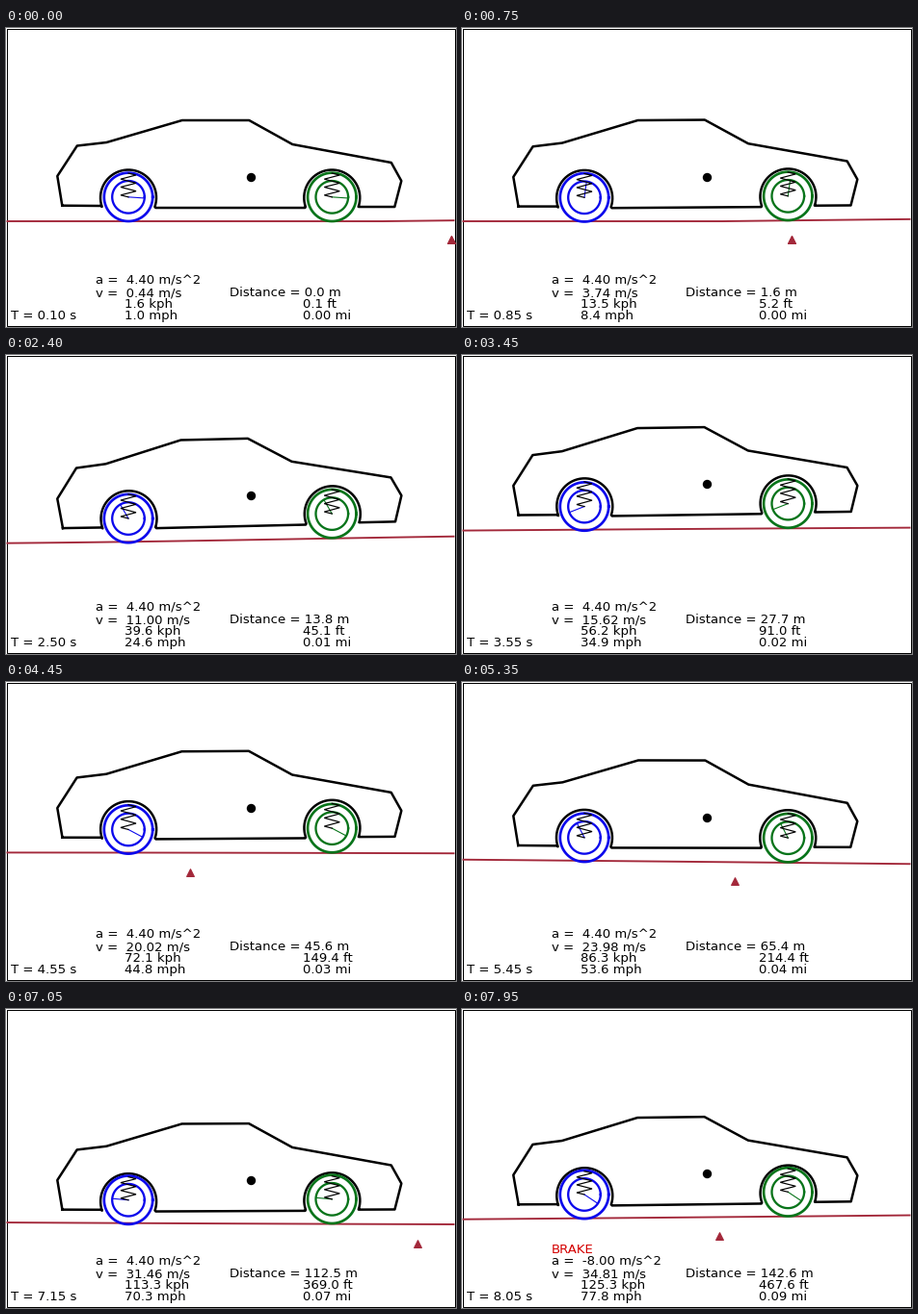
Animation, 467 px wide and 311 px high, one loop 8000 ms. Source, as a matplotlib script:

```python
import numpy as np
import matplotlib.pyplot as plt
from matplotlib.animation import FuncAnimation

W, H, DPI = 467, 311, 64
PX = 72 / DPI              # points per pixel
SCALE = 76.7               # pixels per metre
CG_X, CG_Y = 254.3, 155.0
ROAD_Y = 201.0
WHEEL_R = 0.3284           # metres
AXLES = (-127.3, 84.0)     # pixels from the centre of gravity
MARK_START, MARK_GAP = 2.735, 7.0
BLUE, GREEN, BROWN = "#0c08ec", "#08741a", "#a3283a"

plt.rcParams["font.family"] = "DejaVu Sans"
fig = plt.figure(figsize=(W / DPI, H / DPI), dpi=DPI, facecolor="white")
ax = fig.add_axes([0, 0, 1, 1])
ax.set_xlim(0, W)
ax.set_ylim(H, 0)
ax.axis("off")


def line(color, width, **kw):
    return ax.plot([], [], color=color, lw=width * PX, **kw)[0]


def label(x, y, color="black"):
    return ax.text(x, y, "", fontsize=13.2 * PX, color=color, va="baseline")


def arch(cx):
    """Wheel arch, traced from its front end over the top to the back."""
    a = np.radians(np.linspace(-19, 199, 40))
    return np.column_stack([cx + 29 * np.cos(a), 21.5 - 29 * np.sin(a)])


def body_shape():
    top = [(-196, 29.7), (-201, -1), (-180.5, -32.5), (-150, -36),
           (-71.5, -59), (-2, -59), (43, -34), (145.5, -15), (156, 4),
           (149, 31), (112, 31)]
    sill = [(56, 32), (-99, 32)]
    tail = [(-156, 30), (-196, 29.7)]
    return np.vstack([top, arch(AXLES[1]), sill, arch(AXLES[0]), tail])


def road(x):
    """Road height in pixels at x metres."""
    rise = 23.6 * np.sin(np.maximum(x - 1.8, 0) / 25.3)
    return rise - 2.7 * np.exp(-((x - 11.3) / 4.4) ** 2)


def drive(n):
    """Speed, distance and braking steps after n steps of 1 ms."""
    k = min(n, 8001)
    b = n - k
    top = 0.0044 * k
    dist = 2.2e-6 * k * (k + 1) + 0.001 * b * top - 4e-6 * b * (b + 1)
    return top - 0.008 * b, dist, b


BODY = body_shape()
TURN = np.linspace(0, 2 * np.pi, 80)
COIL_X = np.array([0, 8, -8, 8, -8, 8, -8, 0])
COIL_T = np.concatenate([[0], np.linspace(0.08, 0.92, 6), [1]])
ROAD_PX = np.linspace(0.5, 465.5, 120)

# frame and axis ticks
ax.plot([0.5, 465.5, 465.5, 0.5, 0.5], [0.5, 0.5, 309.5, 309.5, 0.5],
        color="black", lw=PX, solid_joinstyle="miter")
for m in range(-3, 3):
    x = CG_X + m * SCALE
    ax.plot([x, x], [309.5, 311], color="black", lw=0.8 * PX)

road_line = line(BROWN, 1.9, solid_capstyle="butt")
marks = line(BROWN, 0, marker="^", markersize=8 * PX, markeredgewidth=PX)
body = line("black", 2.5, solid_joinstyle="round")
wheels = [(line(color, 2.7), line(color, 2.3), line(color, 1.1),
           line("black", 1.2, solid_joinstyle="miter"))
          for color in (BLUE, GREEN)]
dot = line("black", 0, marker="o", markersize=9.4 * PX, markeredgewidth=0)

brake = label(92.7, 254.4, "#d40000")
accel = label(92.7, 266.6)
speed = label(92.8, 279.2)
kph = label(123.4, 291.2)
mph = label(123.4, 303.4)
clock = label(4.8, 303.4)
metres = label(232.2, 279.2)
feet = label(308.4, 291.2)
miles = label(308.4, 303.4)


def draw_wheel(parts, cx, cy, turn, spring_x, spring_y):
    rim, hub, spoke, spring = parts
    r = WHEEL_R * SCALE
    rim.set_data(cx + r * np.cos(TURN), cy + r * np.sin(TURN))
    hub.set_data(cx + 16.8 * np.cos(TURN), cy + 16.8 * np.sin(TURN))
    spoke.set_data([cx, cx + 16.8 * np.cos(turn)],
                   [cy, cy + 16.8 * np.sin(turn)])
    spring.set_data(spring_x + (cx - spring_x) * COIL_T + COIL_X,
                    spring_y + (cy - spring_y) * COIL_T)


def update(i):
    n = 100 + 50 * i
    t = n / 1000
    v, d, braking = drive(n)

    road_line.set_data(ROAD_PX, ROAD_Y - road(d + (ROAD_PX - CG_X) / SCALE))
    first = np.floor((d - 6) / MARK_GAP)
    mx = MARK_START + MARK_GAP * np.maximum(first + np.arange(4), 0)
    marks.set_data(CG_X + (mx - d) * SCALE, ROAD_Y + 20 - road(mx))

    # body rides on both axles and squats as load moves to the rear
    back, front = (road(d + a / SCALE) for a in AXLES)
    span = AXLES[1] - AXLES[0]
    lift = 1.04 * (back - (front - back) * AXLES[0] / span)
    load = 1 - np.exp(-(t - 0.1) / 1.5) - 0.012 * braking
    pitch = (front - back) / span + 0.0085 * load
    cy = CG_Y - lift
    body.set_data(CG_X + BODY[:, 0] + BODY[:, 1] * pitch,
                  cy + BODY[:, 1] - BODY[:, 0] * pitch)
    dot.set_data([CG_X], [cy])

    heights = (back - 1.2 * load, front + 0.6 * load)
    for parts, a, h in zip(wheels, AXLES, heights):
        draw_wheel(parts, CG_X + a, ROAD_Y - WHEEL_R * SCALE - h,
                   d / WHEEL_R, CG_X + a - 4 * pitch, cy - 4 - a * pitch)

    brake.set_text("BRAKE" if braking else "")
    accel.set_text(f"a =  {-8 if braking else 4.4:.2f} m/s^2")
    speed.set_text(f"v =  {v:.2f} m/s")
    kph.set_text(f"{v * 3.6:.1f} kph")
    mph.set_text(f"{v * 3.6 * 0.621:.1f} mph")
    clock.set_text(f"T = {t:.2f} s")
    metres.set_text(f"Distance = {d:.1f} m")
    feet.set_text(f"{d * 3.28:.1f} ft")
    miles.set_text(f"{d / 1609:.2f} mi")
    return []


ani = FuncAnimation(fig, update, frames=160, interval=50, repeat=True,
                    repeat_delay=0, init_func=lambda: update(0),
                    cache_frame_data=False)
plt.show()
```
